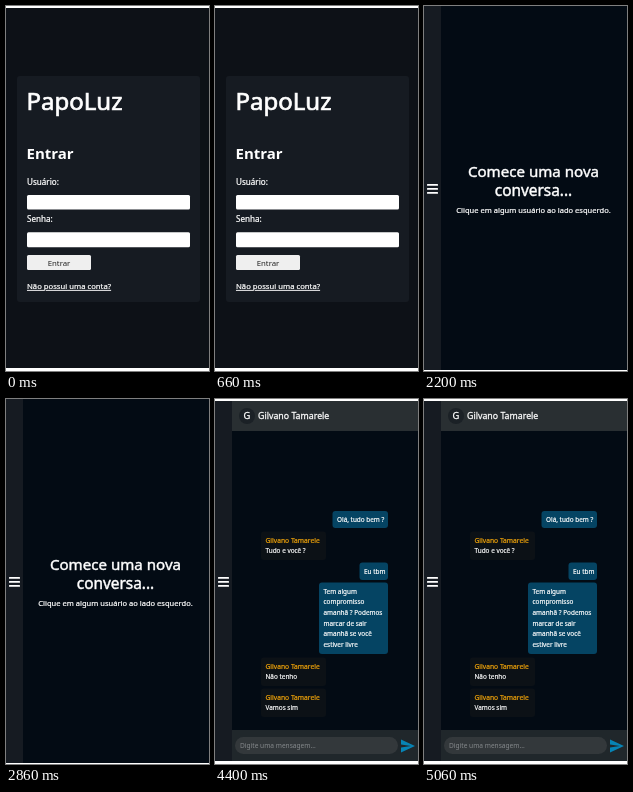
Write an HTML page that moves like this. It is 203 px wide and 365 px high and loops after 5.5 s.

```html
<!DOCTYPE html>
<html lang="pt-BR">
<head>
<meta charset="utf-8">
<title>PapoLuz</title>
<style>
  html, body { margin: 0; width: 100%; height: 100%; overflow: hidden; background: #fff; }
  svg { display: block; width: 203px; height: 365px; font-family: "Noto Sans", "Open Sans", sans-serif; }
</style>
</head>
<body>
<svg id="stage" viewBox="0 0 203 365"></svg>
<script>
const STEP = 1100;
const PANEL = '#161b22', PAGE = '#0d1117', NIGHT = '#030b14', BLUE = '#054463';
const CONTACT = 'Gilvano Tamarele';

const rect = (x, y, right, bottom, fill, r = 0) =>
  `<rect x="${x}" y="${y}" width="${right - x}" height="${bottom - y}" rx="${r}" fill="${fill}"/>`;

// A thin outline in the fill colour gives regular text a medium weight.
const text = (x, y, size, str, { fill = '#fff', weight = 400, anchor = 'start', outline = .03, extra = '' } = {}) =>
  `<text x="${x}" y="${y}" font-size="${size}" fill="${fill}" font-weight="${weight}" text-anchor="${anchor}"
    stroke="${fill}" stroke-width="${weight > 400 ? 0 : size * outline}" ${extra}>${str}</text>`;
const centered = { anchor: 'middle' };

const avatar = (x, y, letter, fill) =>
  `<circle cx="${x}" cy="${y}" r="8" fill="${fill}"/>` + text(x, y + 3.4, 9.4, letter, centered);

const sidebar = (top, bottom) => rect(0, top, 17, bottom, PANEL) +
  [178, 182, 186].map(y => rect(3, y, 14, y + 1.8, '#fff', .6)).join('');

function form(x, top, right, bottom, action, link) {
  const left = x + 10, edge = right - 10, shift = top - 69;
  return rect(x, top, right, bottom, PANEL, 3) +
    text(left - .5, 103 + shift, 24, 'PapoLuz') +
    text(left - .5, 153, 15, action, { weight: 700 }) +
    text(left, 179, 8.1, 'Usuário:') +
    rect(left, 188.5 + shift / 2, edge, 203.6, '#fff', 1.5) +
    text(left, 216, 8.1, 'Senha:') +
    rect(left, 226.8 - shift / 2, edge, 241.8 - shift / 2, '#fff', 1.5) +
    rect(left, 249, left + 64, 264.5 - shift / 2, '#efefef', 1.5) +
    text(left + 32, 260, 7.8, action, { ...centered, fill: '#222', outline: 0 }) +
    text(left, 284 - shift, 7.7, link, { extra: 'text-decoration="underline"' });
}

function welcome() {
  return rect(0, 0, 203, 364, NIGHT) + sidebar(0, 364) +
    text(109.5, 170.5, 15.1, 'Comece uma nova', centered) +
    text(109.5, 190, 15.4, 'conversa...', centered) +
    text(109.5, 206.5, 7.55, 'Clique em algum usuário ao lado esquerdo.', centered);
}

function userList() {
  const names = ['Prado Belmirim', 'Jairo Tulim', CONTACT, 'June Talvo', 'Dorval Mirta',
    'Mirtelo Savano', 'Malva Edorina', 'Belisra Tolva', 'Fabelo Morvins',
    'Ari Clemo', 'Ada Jolva', 'Jora Mevial'];
  const rows = names.map((name, i) => {
    const y = 69 + 26.75 * i;
    return avatar(24, y, name[0], '#20262d') +
      text(35, y + 3, 8.7, name) +
      rect(17, y + 13, 184, y + 13.6, '#22282f');
  }).join('');
  return rect(0, 1, 203, 364, PANEL) +
    '<path d="M174 15l9.5 9.5m0-9.5l-9.5 9.5" stroke="#fff" stroke-width="1.4"/>' +
    text(101, 44, 11, 'LISTA DE USUÁRIOS', { ...centered, weight: 700 }) +
    rows + rect(0, 364, 203, 365, '#fff');
}

const sent = (x, y, bottom, lines) => rect(x, y, 173, bottom, BLUE, 3) +
  lines.map((line, i) => text(x + 4.5, y + 11 + 10.7 * i, 6.4, line)).join('');

const received = (y, line) => rect(46, y, 111, y + 28.5, '#0c1116', 3) +
  text(50.5, y + 11.3, 6.7, CONTACT, { fill: '#f0a30a' }) +
  text(50.5, y + 21.7, 6.4, line);

function chat() {
  return rect(0, 2, 203, 362, NIGHT) + sidebar(2, 362) +
    rect(17, 2, 203, 32, '#292f32') + avatar(32, 17, CONTACT[0], '#1b2126') +
    text(43, 20, 8.8, CONTACT) +
    sent(117.5, 112, 129, ['Olá, tudo bem ?']) +
    received(132.5, 'Tudo e você ?') +
    sent(144.5, 163.5, 181, ['Eu tbm']) +
    sent(104, 183.5, 255, ['Tem algum', 'compromisso', 'amanhã ? Podemos',
      'marcar de sair', 'amanhã se você', 'estiver livre']) +
    received(258.5, 'Não tenho') + received(289.5, 'Vamos sim') +
    rect(17, 331, 203, 362, '#20272b') + rect(20, 338, 183, 355, '#33383b', 8.5) +
    text(25, 349.3, 6.6, 'Digite uma mensagem...', { fill: '#85898c', outline: 0 }) +
    '<path d="M186 340.5L200 347L186 353.5V348.5L196 347L186 345.5Z" fill="#0784b5"/>';
}

const scenes = [
  rect(0, 2, 203, 362, PAGE) + form(11, 70, 194, 296, 'Entrar', 'Não possui uma conta?'),
  rect(0, 0, 203, 365, PAGE) + form(9, 69, 193.5, 297, 'Registrar', 'Já possui uma conta?'),
  welcome(), userList(), chat()
];

const stage = document.getElementById('stage');
stage.innerHTML = scenes.map(s => `<g visibility="hidden">${s}</g>`).join('');
const groups = [...stage.children];

function draw(now) {
  const current = Math.floor(now / STEP) % groups.length;
  groups.forEach((g, i) => g.setAttribute('visibility', i === current ? 'visible' : 'hidden'));
  requestAnimationFrame(() => draw(performance.now() - start));
}
const start = performance.now();
draw(0);
</script>
</body>
</html>
```
